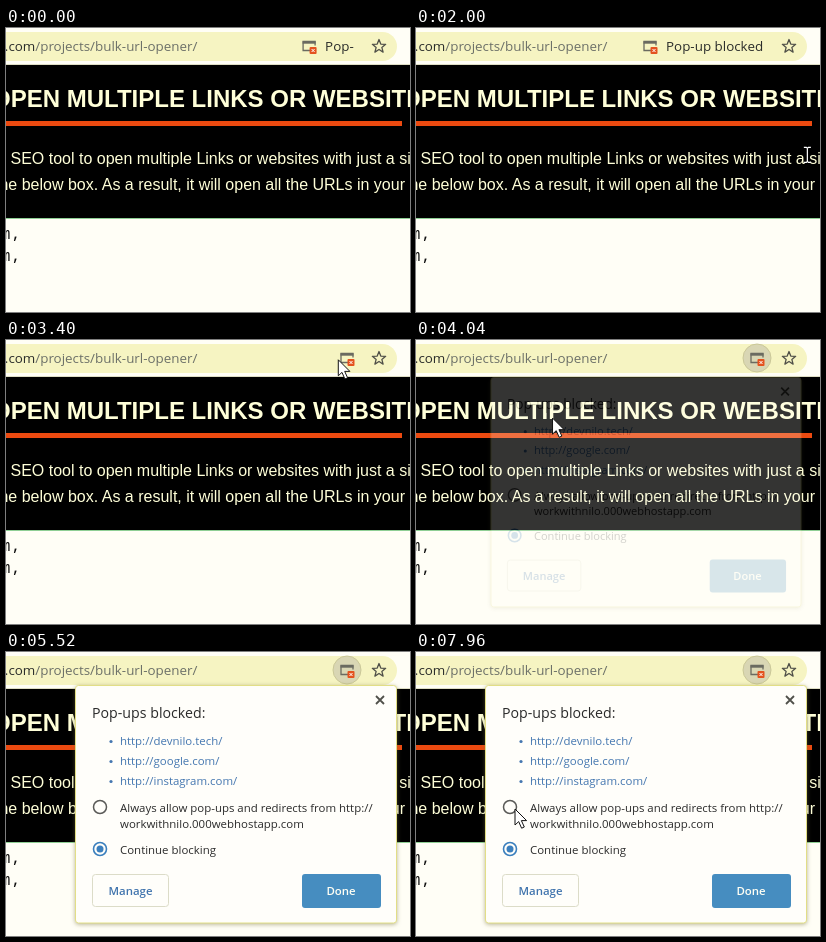
An HTML page for the animation above (8000 ms loop, 404x284 px).

```html
<!DOCTYPE html>
<html lang="en">
<head>
<meta charset="utf-8">
<title>Blocked pop-ups</title>
<style>
  html, body { margin: 0; width: 100%; height: 100%; overflow: hidden; background: #fffef6; }
  svg { display: block; width: 404px; height: 284px; }
  text { font-family: "Open Sans", "Noto Sans", sans-serif; white-space: pre; }
  .page text { font-family: "Liberation Sans", Arial, sans-serif; font-size: 16px; fill: #ffffd8; }
  .page .title { font-size: 24px; font-weight: bold; }
  .page .code { font-family: "Noto Sans Mono", "DejaVu Sans Mono", monospace; font-size: 16px; fill: #111; }
  .bar text { font-size: 13.4px; fill: #2a2c2a; }
  .bar .path { fill: #6c7068; }
  #popup { filter: drop-shadow(0 1px 2px #77704088); }
  #popup text { font-size: 11.45px; fill: #2b2b2b; }
  #popup .head { font-size: 14.2px; }
  #popup .link { fill: #4577b0; }
  #popup .button { font-weight: 600; text-anchor: middle; }
</style>
</head>
<body>
<svg viewBox="0 0 404 284">
  <defs><clipPath id="chipClip"><rect width="348" height="37"/></clipPath></defs>

  <g class="page">
    <rect y="36" width="404" height="1" fill="#dfdec4"/>
    <rect y="37" width="404" height="153" fill="#000"/>
    <rect y="190" width="404" height="1" fill="#8fcf95"/>
    <text class="title" x="-14" y="79">OPEN MULTIPLE LINKS OR WEBSITES</text>
    <rect y="93" width="396" height="5" fill="#ec4a10"/>
    <text x="4.5" y="136">SEO tool to open multiple Links or websites with just a single</text>
    <text x="-11" y="162">the below box. As a result, it will open all the URLs in your</text>
    <text class="code" x="-5.2" y="211">m,</text>
    <text class="code" x="-5.2" y="233">m,</text>
  </g>

  <g class="bar">
    <rect id="field" x="-30" y="4" width="421" height="29" rx="14.5"/>
    <text x="-1.2" y="23">.com<tspan class="path">/projects/bulk-url-opener/</tspan></text>
    <circle id="halo" cx="341" cy="18" r="14" fill="#d9d6b4" stroke="#cbc898"/>
    <path id="divider" d="M348.5 13v11" stroke="#a9a77c"/>
    <g clip-path="url(#chipClip)"><text id="label" y="23">Pop-up blocked</text></g>
    <g id="icon">
      <path d="M2 4.5h-7.5v-9h12v4" fill="none" stroke="#6a6a60" stroke-width="1.3"/>
      <path d="M-6-3.5h13" stroke="#6a6a60" stroke-width="2.4"/>
      <rect x="1" y="1" width="7" height="7" rx="1" fill="#e4521f"/>
      <path d="M3 3l3 3m0-3l-3 3" stroke="#fff"/>
    </g>
    <path id="star" fill="none" stroke="#505048" stroke-width="1.3" stroke-linejoin="round"/>
  </g>

  <g id="popup">
    <rect x="69.5" y="33.5" width="321" height="237.5" rx="3" fill="#fffefa" stroke="#e2de86"/>
    <path d="M370 44l8 8m0-8l-8 8" stroke="#50504a" stroke-width="1.8"/>
    <text class="head" x="86" y="66">Pop-ups blocked:</text>
    <g id="links"></g>
    <circle cx="94" cy="155" r="6.5" fill="none" stroke="#5a5a58" stroke-width="1.5"/>
    <text x="114" y="160">Always allow pop-ups and redirects from http://</text>
    <text x="114" y="176">workwithnilo.000webhostapp.com</text>
    <circle cx="94" cy="197" r="6.5" fill="none" stroke="#3b7fbd" stroke-width="1.6"/>
    <circle cx="94" cy="197" r="3.5" fill="#3b7fbd"/>
    <text x="114" y="202">Continue blocking</text>
    <rect x="86.5" y="222.5" width="76" height="32" rx="3" fill="none" stroke="#dcdcc8"/>
    <text class="button" x="124.5" y="243" style="fill:#4275ae">Manage</text>
    <rect x="296" y="222" width="79" height="34" rx="3" fill="#468dc0"/>
    <text class="button" x="335" y="243" style="fill:#fffff4">Done</text>
  </g>

  <path id="beam" d="M-3.5-7.5h2.5l1 1l1-1h2.5M0-6.5v13M-3.5 7.5h2.5l1-1l1 1h2.5" fill="none" stroke-width="1.2"/>
  <path id="arrow" d="M0 0v16l3.7-3.4 2.9 6.6 2.7-1.2-2.9-6.4h5.2z" fill="#fff" stroke="#111"/>
</svg>
<script>
const $ = id => document.getElementById(id);
const clamp = v => Math.min(1, Math.max(0, v));
const ramp = (t, from, to) => clamp((t - from) / (to - from));
const smooth = u => u * u * (3 - 2 * u);
const LOOP = 8000, REST_X = 341, CHIP = 107;

// time, x, y of the pointer
const route = [
  [0, 425, 165], [1280, 412, 152], [1720, 397, 135], [1880, 397, 135], [2000, 391.5, 127],
  [2680, 297.5, 22], [2960, 300, 19], [3520, 341, 20], [3890, 341, 20], [4040, 137, 78],
  [4280, 26, 95], [4440, -20, 102], [5920, -20, 190], [6300, 62, 186], [6600, 96, 160],
  [6760, 97, 159], [7560, 99, 157], [LOOP, 99, 157]
];

function pointer(t) {
  const i = route.findIndex(p => p[0] > t);
  const [t0, x0, y0] = route[i - 1], [t1, x1, y1] = route[i];
  const u = ramp(t, t0, t1);
  return [x0 + (x1 - x0) * u, y0 + (y1 - y0) * u];
}

$('links').innerHTML = ['devnilo.tech', 'google.com', 'instagram.com'].map((site, i) =>
  `<circle cx="105" cy="${89.5 + 20 * i}" r="1.6" fill="#4577b0"/>` +
  `<text class="link" x="114" y="${93 + 20 * i}">http://${site}/</text>`).join('');

$('star').setAttribute('d', 'M' + Array.from({ length: 10 }, (_, i) => {
  const r = i % 2 ? 3 : 7, a = (i / 5 - .5) * Math.PI;
  return [373 + r * Math.cos(a), 18.5 + r * Math.sin(a)].map(v => v.toFixed(2));
}).join('L') + 'Z');

function draw(t) {
  const open = smooth(ramp(t, -256, 384)) - smooth(ramp(t, 2160, 2800));
  const iconX = REST_X - CHIP * open;
  $('icon').setAttribute('transform', `translate(${iconX - .5} 18)`);
  $('label').setAttribute('x', iconX + 16);
  $('divider').setAttribute('opacity', t > 2160 && open > 0 ? 1 - open : 0);
  $('halo').setAttribute('opacity', ramp(t, 3480, 3680));

  const [x, y] = pointer(t);
  const inBar = y < 35 && x < 391;
  const onIcon = inBar && x > 326;
  const isBeam = t < 3890 && !onIcon;
  $('field').setAttribute('fill', inBar && !onIcon ? '#eef09c' : '#f6f4c2');
  for (const [id, on] of [['beam', isBeam], ['arrow', !isBeam]]) {
    $(id).setAttribute('transform', `translate(${x} ${y})`);
    $(id).setAttribute('visibility', on ? 'visible' : 'hidden');
  }
  $('beam').setAttribute('stroke', y > 37 ? '#fff' : '#111');

  const shown = ramp(t, 4000, 4200), scale = .957 + .043 * shown;
  $('popup').setAttribute('opacity', shown);
  $('popup').setAttribute('transform',
    `translate(230 152) scale(${scale}) translate(-230 -152)`);
}

function tick() {
  draw(performance.now() % LOOP);
  requestAnimationFrame(tick);
}
tick();
</script>
</body>
</html>
```
